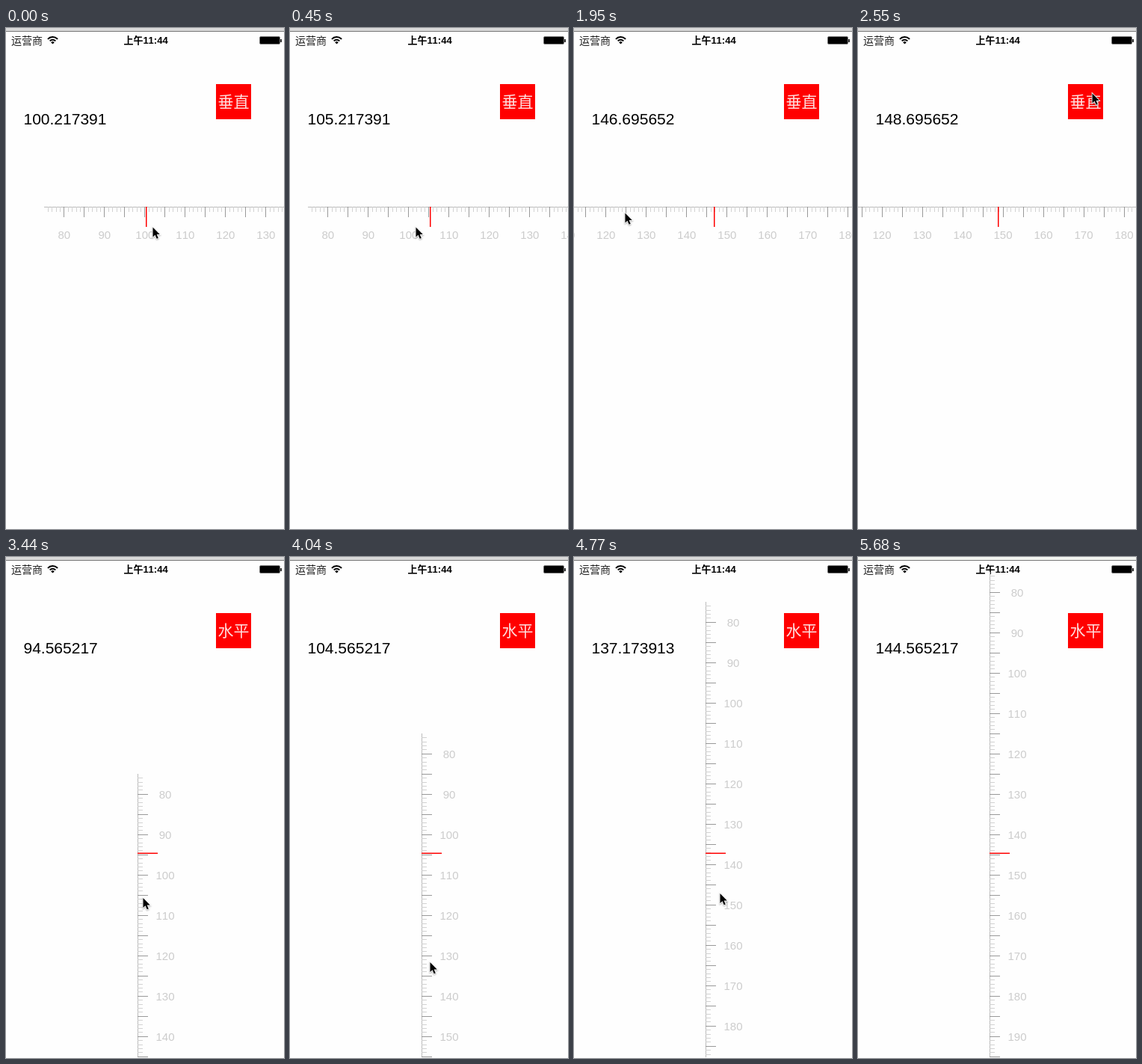
An HTML page with a canvas that plays this animation: 372x670 px, repeating every 5730 ms.

```html
<!DOCTYPE html>
<html lang="zh">
<head>
<meta charset="utf-8">
<title>Ruler</title>
<style>
  html, body { margin: 0; width: 100%; height: 100%; overflow: hidden; background: #fefefe; }
  canvas { display: block; }
</style>
</head>
<body>
<canvas id="stage" width="372" height="670"></canvas>
<script>
const ctx = document.getElementById('stage').getContext('2d');
const LOOP = 5730, STEP = 150, UNIT = 5.4;
const FIRST = 75, LAST = 240, INITIAL = 100.2174;
const VERTICAL_FROM = 2840, CURSOR_GONE = 5220, STRIP_FADES = 5680;
const LATIN = '"Liberation Sans", Arial, "Noto Sans CJK SC", "Noto Sans CJK", sans-serif';
const CJK = '"Noto Sans CJK SC", "Noto Sans CJK", sans-serif';
ctx.fontKerning = 'none';

// The picture advances in steps, restarting after each slightly short one.
function snap(t) {
  const base = [4770, 4630, 2690, 0].find(start => t >= start);
  return base + Math.floor((t - base) / STEP) * STEP;
}

function ease(t, start, end) {
  const p = Math.min(1, Math.max(0, (t - start) / (end - start)));
  return p * p * (3 - 2 * p);
}

function valueAt(t) {
  const value = t < VERTICAL_FROM
    ? INITIAL + 5 * ease(t, 150, 450) * (t >= 300) + 43.4783 * ease(t, 750, 2129)
    : INITIAL - 5.6522 * ease(t, 2990, 3440) + 50 * ease(t, 3594.5, 5146.1);
  return Math.round(value * 23) / 23;
}

// Stops of the cursor once it lets go of the horizontal ruler: time, x, y
const STOPS = [
  [1800, 40, 266], [2550, 313.5, 87.5], [2690, 313.5, 87.5],
  [2990, 188, 395], [3440, 183.5, 456], [3740, 187, 600],
  [4040, 187.5, 542], [4490, 192, 442], [4770, 195.5, 450], [5220, 290, 610]
];

function cursorAt(t) {
  if (t < STOPS[0][0]) return [Math.max(40, 196.5 - (valueAt(t) - INITIAL) * 5.6), 266.5];
  const next = Math.max(1, STOPS.findIndex(stop => stop[0] >= t));
  const [t0, x0, y0] = STOPS[next - 1], [t1, x1, y1] = STOPS[next];
  const p = ease(t, t0, t1);
  return [x0 + (x1 - x0) * p, y0 + (y1 - y0) * p];
}

function rect(color, x, y, w, h) {
  ctx.fillStyle = color;
  ctx.fillRect(x, y, w, h);
}

function text(str, x, y, font, color = '#000', align = 'left') {
  ctx.font = font;
  ctx.fillStyle = color;
  ctx.textAlign = align;
  ctx.fillText(str, x, y);
}

function drawStatusBar(t) {
  rect(t < STRIP_FADES ? '#d9d9d9' : '#f3f5f1', 0, 0, 372, 4);
  rect('#777', 0, 4, 372, 1);
  text('运营商', 7, 22, '14px ' + CJK, '#222');
  text('上午11:44', 187, 21, 'bold 13px ' + LATIN, '#000', 'center');

  ctx.strokeStyle = '#000';
  ctx.lineWidth = 2;
  for (const r of [5.2, 9]) {
    ctx.beginPath();
    ctx.arc(62.5, 21, r, -Math.PI * 0.76, -Math.PI * 0.24);
    ctx.stroke();
  }
  ctx.fillStyle = '#000';
  ctx.beginPath();
  ctx.moveTo(62.5, 21.5);
  ctx.arc(62.5, 21.5, 3.2, -Math.PI * 0.76, -Math.PI * 0.24);
  ctx.fill();

  ctx.strokeStyle = '#777';
  ctx.lineWidth = 1;
  ctx.beginPath();
  ctx.roundRect(339.5, 11.5, 27, 10, 1.5);
  ctx.fill();
  ctx.stroke();
  rect('#333', 367, 15, 2, 4);
}

function drawRuler(value, vertical) {
  const origin = vertical ? 396 : 187;
  const edge = vertical ? 176 : 239;
  const limit = vertical ? 669 : 372;
  const at = v => origin + (v - value) * UNIT;
  // "along" runs with the scale, "across" away from its edge.
  const bar = (color, along, across, length, depth) => vertical
    ? rect(color, across, along, depth, length)
    : rect(color, along, across, length, depth);

  const start = Math.round(at(FIRST));
  bar('#bbb', start, edge, limit - start, 1);
  for (let v = FIRST + 1; v <= LAST; v++) {
    const pos = Math.floor(at(v));
    if (pos >= limit) break;
    const major = v % 5 === 0;
    bar(major ? '#999' : '#d2d2d2', pos, edge, 1, major ? 14 : 7);
  }
  for (let v = 80; v <= LAST; v += 10) {
    const [x, y] = vertical ? [213, at(v) + 5.7] : [at(v), 282];
    text(v, x, Math.round(y), '15px ' + LATIN, '#ccc', 'center');
  }
  bar('#f00', vertical ? 395.5 : 187, edge, 1.5, 27);
}

const ARROW = new Path2D('M0 0V13L3 10.2L5.2 15.3L7.3 14.4L5.2 9.6H9.3Z');

function drawCursor(x, y) {
  ctx.save();
  ctx.translate(x, y);
  ctx.shadowColor = 'rgba(0,0,0,.35)';
  ctx.shadowBlur = 2;
  ctx.shadowOffsetY = 1;
  ctx.strokeStyle = '#fff';
  ctx.lineWidth = 1.6;
  ctx.stroke(ARROW);
  ctx.shadowColor = 'transparent';
  ctx.fillStyle = '#000';
  ctx.fill(ARROW);
  ctx.restore();
}

function draw(t) {
  const step = snap(t);
  const value = valueAt(step);
  const vertical = step >= VERTICAL_FROM;

  rect('#fefefe', 0, 0, 372, 670);
  drawStatusBar(t);
  text(value.toFixed(6), 23.5, 129, '21px ' + LATIN);
  rect('#f00', 281, 75, 47, 47);
  text(vertical ? '水平' : '垂直', 304.5, 106, '300 21px ' + CJK, '#ffdede', 'center');
  drawRuler(value, vertical);
  if (step < CURSOR_GONE) drawCursor(...cursorAt(step));
}

function frame() {
  draw(performance.now() % LOOP);
  requestAnimationFrame(frame);
}
frame();
</script>
</body>
</html>
```
